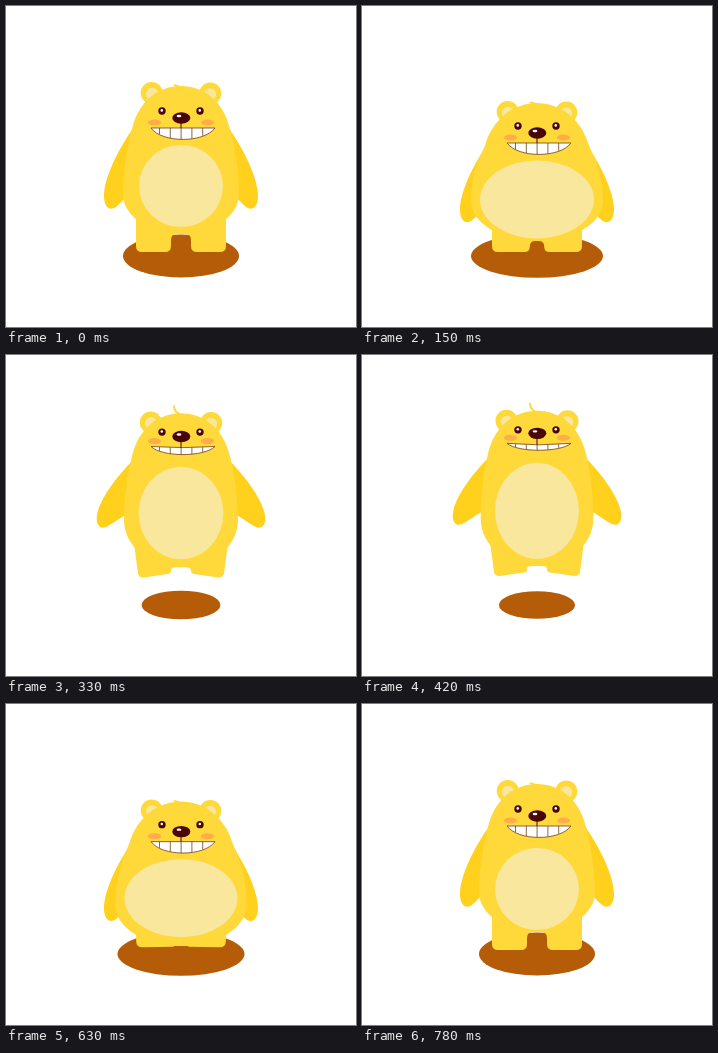
Write an HTML page that moves like this. It is 350 px wide and 321 px high and loops after 840 ms.

```html
<!DOCTYPE html>
<html lang="en">
<head>
<meta charset="utf-8">
<title>Jumping bear</title>
<style>
html, body { margin: 0; width: 100%; height: 100%; overflow: hidden; background: #fff; }
svg { display: block; width: 100vw; height: 100vh; }
</style>
</head>
<body>
<svg id="stage" viewBox="0 0 350 321"></svg>
<script>
const LOOP = 840, STEP = 30, LAST = 780, CX = 175;
const BODY = '#ffd83a', ARM = '#ffd01c', PALE = '#f8e79d', DARK = '#4a0606', LINE = '#70401c';

const stage = document.getElementById('stage');
function set(node, attrs) {
  for (const name in attrs) node.setAttribute(name, attrs[name]);
}
function add(tag, attrs) {
  const node = document.createElementNS('http://www.w3.org/2000/svg', tag);
  set(node, attrs);
  stage.appendChild(node);
  return node;
}
const oval = (cx, rx, ry, fill) => add('ellipse', { cx, rx, ry, fill });
const shape = (fill, more) => add('path', { fill, ...more });
const pair = make => [-1, 1].map(make);

const shade = oval(CX, 58, 21, '#b55c08');
const arms = pair(() => shape(ARM, { d: 'M0-2C-14 18-28 46-28 64C-28 76-21 80-15 74C-9 69-3 60 10 52V10Z' }));
const ears = pair(() => [oval(CX, 11, 11, BODY), oval(CX, 6.2, 6.2, PALE)]);
const hair = shape('none', { stroke: BODY, 'stroke-width': 2 });
const legs = shape(BODY);
const torso = shape(BODY);
const belly = oval(CX, 42, 41, PALE);
const blush = pair(s => oval(CX + s * 26.5, 6.6, 3, '#ffad4b'));
const eyes = pair(s => [oval(CX + s * 19, 3.7, 3.7, DARK), oval(CX + s * 19 - .2, 1.3, 1.3, '#fff')]);
const mouth = shape('#fff', { stroke: LINE, 'stroke-width': .8, 'stroke-linejoin': 'round' });
const teeth = shape('none', { stroke: LINE, 'stroke-width': .8 });
const lip = shape('none', { stroke: DARK, 'stroke-width': 1 });
const nose = oval(CX + .3, 9, 5.7, DARK);
const shine = oval(CX - 2, 2.4, 1.2, '#fff');

const part = (t, a, b) => Math.min(1, Math.max(0, (t - a) / (b - a)));
const ramp = (t, a, b) => { const u = part(t, a, b); return u * u * (3 - 2 * u); };
const bump = (t, a, b, c, d) => ramp(t, a, b) - ramp(t, c, d);

// Everything follows from the jump height, the squash and the tilt of the face
function poseAt(t) {
  const lift = 25 * (1 - (1 - part(t, 190, 375)) ** 2) * (1 - part(t, 375, 640) ** 3);
  const press = bump(t, 0, 150, 150, 350) + bump(t, 480, 650, 650, 780);
  const sink = 9 * bump(t, 540, 630, 630, 780);
  const swing = bump(t, 180, 330, 420, 545);
  const tilt = bump(t, 150, 420, 420, 560);
  const top = 80 + 17 * press - .87 * lift - 2.5 * tilt + .4 * sink;
  return {
    top, swing, tilt,
    eye: top + 25 - 2 * press - 6 * swing,
    ear: top + 7 + 2 * press + 3 * tilt,
    shoulder: top + 46 - 3.5 * press - 3 * tilt,
    hair: 7 * swing + 1 - press,
    bellyY: top + 100 - 3.5 * press + 5 * ramp(t, 630, 780),
    bellyW: 42 + 15 * press,
    bellyH: 41 - 2 * press + 7 * tilt,
    shade: 58 + 8 * press - .8 * lift,
    wide: 58 + 8 * press - 1.7 * tilt,
    crotch: 228 + 7 * press - .68 * lift + sink,
    foot: 246 - lift,
    toe: Math.min(3.5, lift * .15)
  };
}

function torsoPath({ top, wide, crotch, toe }) {
  const round = 40 + 2 * toe, mid = crotch - round;
  const lean = Math.max(0, wide - 58) * .4;
  const half = s => {
    const at = (d, y) => `${CX + s * d} ${y} `;
    return {
      crown: at(22, top), brow: at(42 + lean / 2, top + 14), neck: at(49 + lean, top + 43),
      under: at(53 + lean * 2, top + 59), hip: at(wide, mid - 25), side: at(wide, mid)
    };
  };
  const [l, r] = pair(half);
  return `M${CX} ${top}C${l.crown}${l.brow}${l.neck}C${l.under}${l.hip}${l.side}`
    + `A${wide} ${round} 0 0 0 ${r.side}C${r.hip}${r.under}${r.neck}C${r.brow}${r.crown}${CX} ${top}Z`;
}

function legsPath({ wide, crotch, foot, toe }) {
  const sole = foot - toe, hip = crotch - 22;
  const inner = 10 - Math.max(0, wide - 58) * .35, outer = 45 - toe * .5;
  const r = Math.max(0, Math.min(6, (sole - crotch) / 2));
  const L = CX - outer, R = CX + outer, a = CX - inner, b = CX + inner;
  return `M${L - toe} ${hip}L${L} ${foot - 6}Q${L} ${foot} ${L + 6} ${foot}`
    + `L${a - r} ${sole}Q${a} ${sole} ${a} ${sole - r}V${crotch + r}Q${a} ${crotch} ${a + r + toe / 2} ${crotch}`
    + `H${b - r - toe / 2}Q${b} ${crotch} ${b} ${crotch + r}V${sole - r}Q${b} ${sole} ${b + r} ${sole}`
    + `L${R - 6} ${foot}Q${R} ${foot} ${R} ${foot - 6}L${R + toe} ${hip}Z`;
}

function drawMouth(y, depth, sag) {
  const low = y + depth * 4 / 3;
  set(mouth, { d: `M145 ${y}Q177 ${y + sag * 2} 209 ${y}C198 ${low} 156 ${low} 145 ${y}Z` });
  let d = '';
  for (let x = 153.5; x < 200; x += 10.8) {
    const k = 1 - ((x - 177) / 32) ** 2;
    d += `M${x} ${y + sag * k}V${y + depth * k ** .8}`;
  }
  set(teeth, { d });
}

function draw(t) {
  const p = poseAt(t), { eye, top, ear, tilt, swing } = p;
  set(shade, { cy: 250, rx: p.shade, ry: Math.min(21.8, 14 + .38 * (p.shade - 38.5)) });
  arms.forEach((arm, i) => {
    const s = i ? -1 : 1;
    set(arm, { transform: `translate(${CX - s * (49 - 6 * swing)} ${p.shoulder}) scale(${s} 1) rotate(${12 * swing})` });
  });
  ears.forEach(([out, inn], i) => {
    const s = i ? 1 : -1, x = 29.3 + 1.2 * tilt;
    set(out, { cx: CX + s * x, cy: ear + i * .5 });
    set(inn, { cx: CX + s * (x - .4), cy: ear + 1 + i * .5 });
  });
  set(hair, { d: `M174 ${top + 1}Q168 ${top - 1} 168 ${top - p.hair}` });
  set(legs, { d: legsPath(p) });
  set(torso, { d: torsoPath(p) });
  set(belly, { cy: p.bellyY, rx: p.bellyW, ry: p.bellyH });

  const up = 3.5 * tilt, noseY = eye + 7 - up, mouthY = eye + 17 - up;
  blush.forEach(b => set(b, { cy: eye + 11.5 - up }));
  eyes.forEach(([ball, dot]) => {
    set(ball, { cy: eye });
    set(dot, { cy: eye - .6 });
  });
  set(nose, { cy: noseY });
  set(shine, { cy: noseY - 2 });
  set(lip, { d: `M${CX} ${noseY}V${mouthY + 1.5 * tilt}` });
  drawMouth(mouthY, 11.4 - 4.5 * tilt, 1.5 * tilt);
}

let start = null;
function tick(now) {
  if (start === null) start = now;
  const t = (now - start) % LOOP;
  draw(Math.min(LAST, Math.floor(t / STEP) * STEP));
  requestAnimationFrame(tick);
}
draw(0);
requestAnimationFrame(tick);
</script>
</body>
</html>
```
